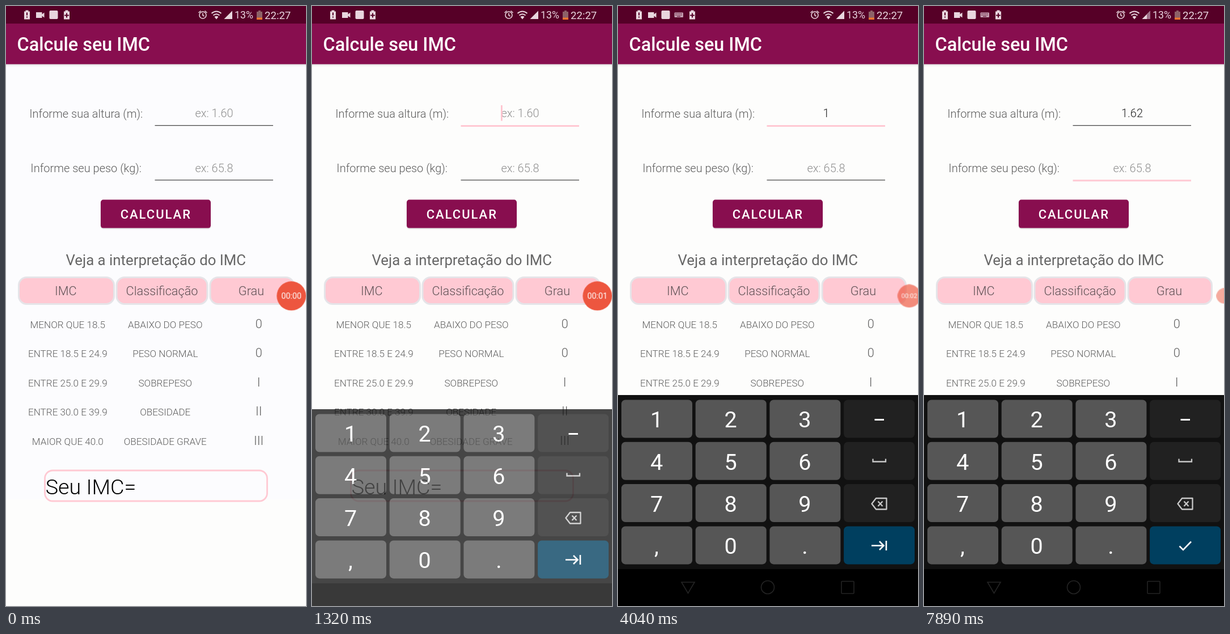
Write an HTML page that moves like this. It is 529 by 1058 pixels and loops after 8000 ms.

```html
<!DOCTYPE html>
<html lang="pt-BR">
<head>
<meta charset="utf-8">
<title>Calcule seu IMC</title>
<style>
html, body { margin: 0; width: 100%; height: 100%; overflow: hidden; background: #fdfdfc; }
svg { display: block; width: 100vw; height: 100vh; font-family: Roboto, "Open Sans", sans-serif; }
text { white-space: pre; }
.mid { text-anchor: middle; }
.light { font-weight: 300; }
.label { font-size: 20px; fill: #5c5c5c; }
.hint { font-size: 20px; fill: #8f8f8f; }
.value { font-size: 20px; fill: #222; }
.head { font-size: 21.7px; fill: #5f5256; }
.cell { font-size: 17.1px; fill: #5f5f5f; }
.grade { font-size: 21.7px; fill: #5f5f5f; }
.digit { font-size: 39.6px; fill: #fff; }
.caret { fill: #ffc4cf; }
.line { fill: #4a4a4a; }
.focus { fill: #ffc9d3; }

/* 8 s loop: 1% = 80 ms */
.s { opacity: 0; animation: 8s step-end infinite; }
.m { animation: 8s linear infinite; }

@keyframes tint { 0% { opacity: 1 } 7% { opacity: 0 } }
@keyframes focusA { 0% { opacity: 0 } 7% { opacity: 1 } 92.375% { opacity: 0 } }
@keyframes blurA { 0% { opacity: 1 } 7% { opacity: 0 } 92.375% { opacity: 1 } }
@keyframes focusB { 0% { opacity: 0 } 92.375% { opacity: 1 } }
@keyframes blurB { 0% { opacity: 1 } 92.375% { opacity: 0 } }

@keyframes v0 { 0% { opacity: 1 } 37.625% { opacity: 0 } }
@keyframes v1 { 0% { opacity: 0 } 37.625% { opacity: 1 } 52.5% { opacity: 0 } }
@keyframes v2 { 0% { opacity: 0 } 52.5% { opacity: 1 } 72.125% { opacity: 0 } }
@keyframes v3 { 0% { opacity: 0 } 72.125% { opacity: 1 } 77.625% { opacity: 0 } }
@keyframes v4 { 0% { opacity: 0 } 77.625% { opacity: 1 } }

@keyframes c0 { 0% { opacity: 0 } 7% { opacity: 1 } 24.625% { opacity: 0 } 30.875% { opacity: 1 } 37.125% { opacity: 0 } }
@keyframes c1 { 0% { opacity: 1 } 44.125% { opacity: 0 } }
@keyframes c2 { 0% { opacity: 1 } 60% { opacity: 0 } 66.625% { opacity: 1 } }
@keyframes c3 { 0% { opacity: 1 } }
@keyframes c4 { 0% { opacity: 1 } 84.375% { opacity: 0 } 90.875% { opacity: 1 } 92.375% { opacity: 0 } }
@keyframes c5 { 0% { opacity: 0 } 92.375% { opacity: 1 } 98.625% { opacity: 0 } }

@keyframes p1 { 0% { opacity: 0 } 36.625% { opacity: .2 } 37.875% { opacity: 0 } }
@keyframes pdot { 0% { opacity: 0 } 51.625% { opacity: .2 } 53.125% { opacity: 0 } }
@keyframes p6 { 0% { opacity: 0 } 71.5% { opacity: .2 } 72.75% { opacity: 0 } }
@keyframes p2 { 0% { opacity: 0 } 77.125% { opacity: .2 } 78.125% { opacity: 0 } }
@keyframes pgo { 0% { opacity: 0 } 91.25% { opacity: .2 } 92.75% { opacity: 0 } }

@keyframes t0 { 0% { opacity: 1 } 16% { opacity: 0 } }
@keyframes t1 { 0% { opacity: 0 } 16% { opacity: 1 } 34.125% { opacity: 0 } }
@keyframes t2 { 0% { opacity: 0 } 34.125% { opacity: 1 } }

@keyframes weak { 0% { opacity: 0 } 84.375% { opacity: 1 } }

@keyframes keyboard {
  0%, 15.99% { opacity: 0; transform: translateY(60px) }
  16% { opacity: .4; transform: translateY(52px) }
  16.5%, 17.74% { opacity: .78; transform: translateY(25px) }
  19.5%, 100% { opacity: 1; transform: none }
}
@keyframes nav { 0%, 19.5% { opacity: 0 } 22%, 100% { opacity: 1 } }
@keyframes shift { 0%, 23.5% { transform: none } 25.2%, 100% { transform: translateX(24px) } }
@keyframes notice { 0%, 25% { opacity: 0 } 27%, 100% { opacity: .75 } }
@keyframes bubble {
  0%, 50.49% { opacity: 1; transform: translate(503.2px, 511.2px) }
  50.5%, 51.62% { opacity: .68; transform: translate(513.5px, 511.2px) scale(.79) }
  53.75%, 100% { opacity: .5; transform: translate(529px, 511.2px) scale(.52) }
}
@keyframes clock { 0%, 51.62% { opacity: 1 } 53%, 100% { opacity: 0 } }
</style>
</head>
<body>
<svg viewBox="0 0 529 1058" preserveAspectRatio="none">
  <defs>
    <linearGradient id="shade" x2="0" y2="1">
      <stop stop-color="#000" stop-opacity=".12"/>
      <stop offset="1" stop-color="#000" stop-opacity="0"/>
    </linearGradient>
    <path id="battery" d="M-5 -6h2.5v-2h5v2H5V8H-5z"/>
  </defs>

  <rect width="529" height="1058" fill="#fdfdfc"/>
  <rect class="s" style="animation-name:tint" width="529" height="870" fill="#fcfcfe"/>

  <!-- app bar -->
  <rect y="102" width="529" height="5" fill="url(#shade)"/>
  <rect width="529" height="102.6" fill="#880e4f"/>
  <rect width="529" height="31" fill="#560027"/>
  <text x="19.5" y="79" font-size="32.4" font-weight="500" fill="#fff">Calcule seu IMC</text>

  <!-- status bar -->
  <g fill="#e8d6de">
    <g transform="translate(37 15.5)"><use href="#battery"/><path d="M-1 -4h2v5h-2zM-1 3h2v2h-2z" fill="#560027"/></g>
    <path d="M53 11h10.5v3.5l4-3v9l-4-3V21H53z"/>
    <rect x="76.5" y="8" width="15" height="15" rx="2"/>
    <g class="m" style="animation-name:shift">
      <g transform="translate(107 15.5)"><use href="#battery"/><path d="M-1 -3h2v3h3v2h-3v3h-2v-3h-3v-2h3z" fill="#560027"/></g>
    </g>
    <g class="m" style="animation-name:notice">
      <rect x="99.5" y="11.5" width="15.5" height="8.5" rx="1"/>
      <path d="M101 13.500h12M101 16h12" stroke="#560027" stroke-dasharray="1.5 1"/>
      <path d="M104 18.3h6" stroke="#560027"/>
    </g>
    <g fill="none" stroke="#e8d6de" stroke-width="1.6">
      <circle cx="347" cy="16" r="6"/>
      <path d="M347 12.500v4l2.5 1.5M339.5 12l4-3.5M354.5 12l-4-3.5"/>
      <path d="M362.5 13q8.5-7 17 0M365.5 16.5q5.5-4.5 11 0" stroke-width="2"/>
    </g>
    <path d="M367.5 19q3.5-2.5 7 0l-3.5 4.5z"/>
    <path d="M399 8.5V23h-14.5z"/>
    <path class="s" style="animation-name:weak" d="M399 8.5V23h-6v-8.5z" fill="#a0728a"/>
    <path d="M442 10h3V8h4v2h3v14h-10z" fill="#8d6268"/>
    <rect x="442" y="20.5" width="10" height="3.5" fill="#f0752f"/>
    <text x="403" y="22" font-size="17.8">13%</text>
    <text x="456" y="22.5" font-size="18.6">22:27</text>
  </g>

  <!-- form -->
  <g class="light mid">
    <text class="label" x="141.2" y="197">Informe sua altura (m):</text>
    <text class="label" x="141.2" y="293">Informe seu peso (kg):</text>
    <text class="hint s" style="animation-name:v0" x="367" y="196">ex: 1.60</text>
    <text class="hint" x="367" y="292.5">ex: 65.8</text>
    <g id="values"></g>
  </g>
  <rect class="line s" style="animation-name:blurA" x="262.5" y="210" width="208.5" height="1.3"/>
  <rect class="focus s" style="animation-name:focusA" x="262.5" y="210" width="208.5" height="3"/>
  <rect class="line s" style="animation-name:blurB" x="262.5" y="306.3" width="208.5" height="1.3"/>
  <rect class="focus s" style="animation-name:focusB" x="262.5" y="306.3" width="208.5" height="3"/>
  <rect class="caret s" style="animation-name:c0" x="333" y="175" width="2.8" height="27.5"/>
  <rect class="caret s" style="animation-name:c5" x="333" y="271" width="2.8" height="27"/>

  <rect x="166.5" y="342.5" width="195" height="51" rx="5" fill="#000" opacity=".1"/>
  <rect x="167" y="341.6" width="194" height="50" rx="4.5" fill="#880e4f"/>
  <text x="201.7" y="375" font-size="22" font-weight="500" letter-spacing=".0893em" fill="#fff">CALCULAR</text>

  <!-- table -->
  <text class="mid" x="264.3" y="457" font-size="25.8" fill="#666">Veja a interpretação do IMC</text>
  <g id="table" class="light mid"></g>

  <rect x="68.5" y="819" width="392" height="54" rx="14" fill="none" stroke="#ffc9d3" stroke-width="2.8"/>
  <text class="light" x="69.7" y="860.6" font-size="37.7" fill="#000">Seu IMC=</text>

  <g class="m" style="animation-name:bubble">
    <circle r="25.8" fill="#ed563f"/>
    <g class="m mid" style="animation-name:clock" font-size="14.3" fill="#fff">
      <text class="s" style="animation-name:t0" y="5">00:00</text>
      <text class="s" style="animation-name:t1" y="5">00:01</text>
      <text class="s" style="animation-name:t2" y="5">00:02</text>
    </g>
  </g>

  <!-- keyboard -->
  <g class="m" style="animation-name:keyboard">
    <rect y="686" width="529" height="308" fill="#111"/>
    <rect y="993" width="529" height="65" fill="#000"/>
    <g id="keys" class="mid"></g>
    <rect x="452.5" y="728" width="16.5" height="3" fill="#fff"/>
    <g fill="none" stroke="#c8c8c8" stroke-width="2.3">
      <path d="M449.5 798.5v5h22.5v-5"/>
      <path d="M455 868h18.5v19.5H455l-7.5-9.75z" stroke-linejoin="round"/>
      <path d="M458.5 873.5l8 8.5M466.5 873.5l-8 8.5"/>
    </g>
    <g fill="none" stroke="#fff" stroke-width="2.6">
      <path class="s" style="animation-name:blurB" d="M447 951.5h21M461 944l7.5 7.5l-7.5 7.5M473 943v17"/>
      <path class="s" style="animation-name:focusB" d="M450.5 952.5l6.5 6.5l14-14.5"/>
    </g>
    <g class="m" style="animation-name:nav" fill="none" stroke="#242424" stroke-width="1.6">
      <path d="M112 1016h23l-11.5 19.5z"/>
      <circle cx="264" cy="1025" r="11.5"/>
      <rect x="394" y="1014.5" width="22" height="21.5" rx="1"/>
    </g>
  </g>
</svg>
<script>
const NS = 'http://www.w3.org/2000/svg';

function add(parent, tag, attrs, text = '') {
  const el = document.createElementNS(NS, tag);
  for (const name in attrs) el.setAttribute(name, attrs[name]);
  el.textContent = text;
  return parent.appendChild(el);
}
const step = name => `animation-name:${name}`;
const group = id => document.getElementById(id);

// Typed height, each state with its own caret
const values = [['1', 371], ['1.', 374.5], ['1.6', 380], ['1.62', 385.5]];
values.forEach(([value, x], i) => {
  const g = add(group('values'), 'g', { class: 's', style: step('v' + (i + 1)) });
  add(g, 'text', { class: 'value', x: 367, y: 196 }, value);
  add(g, 'rect', { class: 'caret s', style: step('c' + (i + 1)), x, y: 175, width: 2.8, height: 27.5 });
});

const table = group('table');
const heads = [['IMC', 22.5, 168, 105.3], ['Classificação', 195, 160, 275], ['Grau', 360, 147.5, 432.5]];
for (const [label, x, width, mid] of heads) {
  add(table, 'rect', { x, y: 478.5, width, height: 47, rx: 14, fill: '#ffc9d3', stroke: '#e5e4e8', 'stroke-width': 3 });
  add(table, 'text', { class: 'head', x: mid, y: 510 }, label);
}
const rows = [
  ['MENOR QUE 18.5', 'ABAIXO DO PESO', '0'],
  ['ENTRE 18.5 E 24.9', 'PESO NORMAL', '0'],
  ['ENTRE 25.0 E 29.9', 'SOBREPESO', 'I'],
  ['ENTRE 30.0 E 39.9', 'OBESIDADE', 'II'],
  ['MAIOR QUE 40.0', 'OBESIDADE GRAVE', 'III']
];
rows.forEach((row, r) => row.forEach((label, c) =>
  add(table, 'text', { class: c < 2 ? 'cell' : 'grade', x: [108.8, 280.8, 445.7][c], y: 568 + r * 51.4 }, label)));

const presses = { 1: 'p1', 2: 'p2', 6: 'p6', '.': 'pdot', go: 'pgo' };
const layout = [['1', '2', '3', ''], ['4', '5', '6', ''], ['7', '8', '9', ''], [',', '0', '.', 'go']];
layout.forEach((keys, r) => keys.forEach((key, c) => {
  const x = 6 + c * 130.7, y = 694.5 + r * 74.3;
  const box = { x, y, width: 125, height: 67, rx: 7 };
  const fill = key === 'go' ? '#003f5f' : key ? '#565656' : '#212121';
  add(group('keys'), 'rect', { ...box, fill });
  if (presses[key]) add(group('keys'), 'rect', { ...box, class: 's', fill: '#fff', style: step(presses[key]) });
  if (c < 3) add(group('keys'), 'text', { class: 'digit', x: x + 62, y: y + 48.7 }, key);
}));
</script>
</body>
</html>
```
